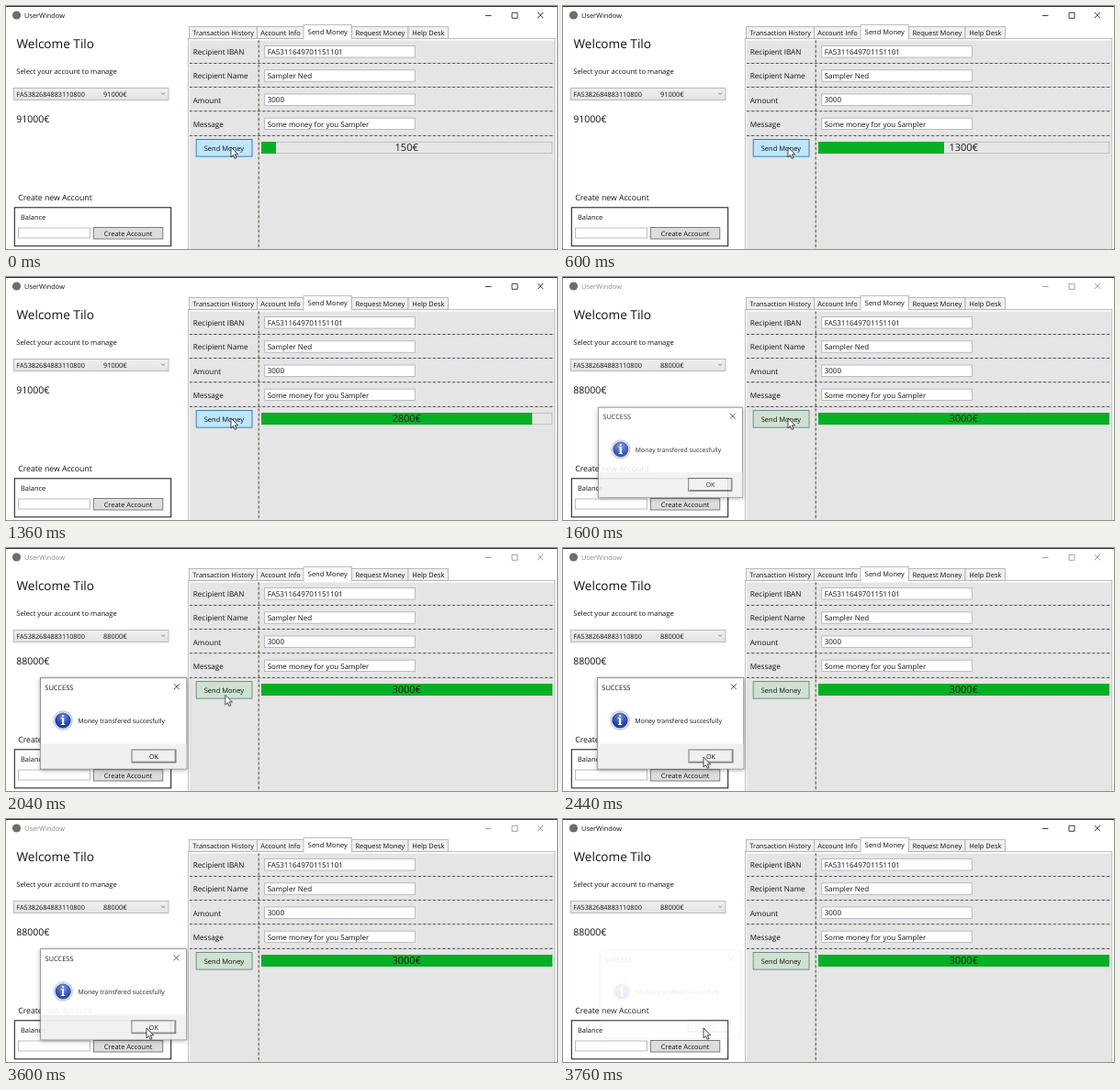
Animation of 600 by 265 pixels, one loop 3.8 s. Source, as an HTML page:

```html
<!DOCTYPE html>
<html lang="en">
<head>
<meta charset="utf-8">
<title>Money transfer</title>
<style>
  @property --amount { syntax: "<integer>"; inherits: true; initial-value: 150; }

  html, body { margin: 0; width: 100%; height: 100%; overflow: hidden; background: #fff; }
  body { position: relative; font-family: "Open Sans", "Noto Sans", sans-serif; text-rendering: geometricPrecision; }
  svg { position: absolute; left: 0; top: 0; width: 600px; height: 265px; }
  text { font-size: 7.45px; fill: #111; }
  .label { font-size: 8.15px; }
  .input rect { fill: #fff; stroke: #abadb3; stroke-width: .8; }
  .input text { font-size: 8px; }
  .number { font-size: 7.25px; }
  .balance { font-size: 10.5px; }
  .tab rect { fill: #f0f0f0; stroke: #acacac; stroke-width: .8; }
  .tab.open rect { fill: #fff; }
  .grid { fill: none; stroke: #d8cf6a; }
  .grid.dash { stroke: #3b3fb4; stroke-dasharray: 2.65; }
  .mid { text-anchor: middle; }

  .old, .new, .caption, .controls, .send, .dialog, .cursor, .progress {
    animation: 3800ms infinite;
  }
  .old { animation-name: leave; animation-timing-function: step-end; }
  .new { animation-name: arrive; animation-timing-function: step-end; }
  .caption { font-size: 7.4px; animation-name: caption; animation-timing-function: step-end; }
  .controls { fill: none; stroke: #111; stroke-width: .8; animation-name: controls; animation-timing-function: step-end; }
  .send { animation-name: send; animation-timing-function: step-end; }
  .dialog { transform-origin: 117px 191px; filter: drop-shadow(0 1px 2.5px #0005); animation-name: dialog; animation-timing-function: linear; }
  .cursor { animation-name: move; animation-timing-function: linear; }

  @keyframes leave { 0% { opacity: 1; } 39.5%, 100% { opacity: 0; } }
  @keyframes arrive { 0% { opacity: 0; } 39.5%, 100% { opacity: 1; } }
  @keyframes caption { 0%, 95.7% { fill: #111; } 40% { fill: #8a8a8a; } 100% { fill: #111; } }
  @keyframes controls { 0%, 95.7% { stroke: #111; } 40% { stroke: #8a8a8a; } 100% { stroke: #111; } }
  @keyframes send {
    0% { fill: #bee6fd; stroke: #3c7fb1; }
    40%, 100% { fill: #cfe2d1; stroke: #71908a; }
  }
  @keyframes dialog {
    0%, 40% { opacity: 0; transform: scale(.93); }
    42.1% { opacity: .87; transform: scale(.985); }
    44.2%, 94.4% { opacity: 1; transform: none; }
    98.95% { opacity: .1; transform: scale(.96); }
    100% { opacity: 0; transform: scale(.95); }
  }
  @keyframes move {
    0%, 51.6% { transform: translate(245px, 154px); }
    53.68% { transform: translate(239px, 160px); }
    58.95% { transform: translate(186px, 201px); }
    64.2%, 100% { transform: translate(153px, 228px); }
  }

  /* One number drives both the bar and its caption. */
  .progress {
    position: absolute; left: 278px; top: 148px; width: 316.5px; height: 13px;
    background: #e6e6e6; box-shadow: inset 0 0 0 1px #c2c2c2;
    font-size: 11px; line-height: 14px; text-align: center; color: #1c1c1c;
    animation-name: count;
  }
  .progress::before {
    content: ""; position: absolute; left: 0; top: 0; height: 100%;
    width: calc(var(--amount) * 1% / 30); background: #06b025;
  }
  .progress::after {
    position: relative; counter-reset: euro var(--amount); content: counter(euro) "€";
  }
  @keyframes count {
    0% { --amount: 150; animation-timing-function: steps(57); }
    38.2%, 100% { --amount: 3000; }
  }
</style>
</head>
<body>
<svg viewBox="0 0 600 265">
  <defs>
    <linearGradient id="face" x2="0" y2="1"><stop stop-color="#f0f0f0"/><stop offset="1" stop-color="#e3e3e3"/></linearGradient>
    <radialGradient id="ball" cy=".3"><stop stop-color="#6f92e6"/><stop offset="1" stop-color="#1f3fae"/></radialGradient>
    <path id="lines" d="M200 62.5H597M200 88.5H597M200 114.7H597M200 141.4H597M275.2 37.5V265"/>
  </defs>
  <rect width="600" height="265" fill="#fff"/>
  <rect width="600" height="1" fill="#2a2a2a"/>

  <!-- title bar -->
  <circle cx="11.5" cy="10" r="4.6" fill="#6a706a"/>
  <text class="caption" x="20" y="12.7">UserWindow</text>
  <path class="controls" d="M522 10.5h6.5M551 7.3h6v6h-6zM578.8 7l6.2 6.2m0-6.2l-6.2 6.2"/>

  <!-- account column -->
  <text x="11.5" y="46" style="font-size:13.6px">Welcome Tilo</text>
  <text x="11.3" y="74" style="font-size:7.65px">Select your account to manage</text>
  <rect x="8.5" y="89.5" width="168.5" height="13" fill="url(#face)" stroke="#acacac" stroke-width=".8"/>
  <text class="number" x="11.3" y="98.9">FA5382684883110800</text>
  <path d="M169.3 94.7l1.8 1.8 1.8-1.8" fill="none" stroke="#666" stroke-width=".8"/>
  <g class="old"><text x="106" y="98.9">91000€</text><text class="balance" x="11.3" y="126.5">91000€</text></g>
  <g class="new"><text x="106" y="98.9">88000€</text><text class="balance" x="11.3" y="126.5">88000€</text></g>

  <text x="13.2" y="211.5" style="font-size:8.7px">Create new Account</text>
  <rect x="9.3" y="219.8" width="170.4" height="42" fill="none" stroke="#111"/>
  <text x="16" y="232.7">Balance</text>
  <rect x="13.5" y="242" width="78" height="11" fill="#fff" stroke="#abadb3" stroke-width=".8"/>
  <rect x="95.3" y="241.5" width="75.5" height="12.5" fill="#ddd" stroke="#707070" stroke-width=".9"/>
  <text class="mid" x="133" y="250.6">Create Account</text>

  <!-- tabs -->
  <rect x="198.4" y="35.4" width="399.4" height="240" fill="#fff" stroke="#acacac" stroke-width=".8"/>
  <rect x="200" y="37.5" width="397" height="228" fill="#e5e5e5"/>
  <g class="tab"><rect x="199.5" y="22.4" width="74" height="13"/><text class="mid" x="236.7" y="31.7">Transaction History</text></g>
  <g class="tab"><rect x="273.5" y="22.4" width="51" height="13"/><text class="mid" x="299" y="31.7">Account Info</text></g>
  <g class="tab"><rect x="376.5" y="22.4" width="61.5" height="13"/><text class="mid" x="407.3" y="31.7">Request Money</text></g>
  <g class="tab"><rect x="438" y="22.4" width="43.5" height="13"/><text class="mid" x="459.8" y="31.7">Help Desk</text></g>
  <g class="tab open"><rect x="324" y="20.6" width="52.5" height="15.4"/><text class="mid" x="350.3" y="31">Send Money</text></g>
  <rect x="324.5" y="35" width="51.6" height="2" fill="#fff"/>

  <!-- transfer form -->
  <use href="#lines" class="grid"/>
  <use href="#lines" class="grid dash"/>
  <text class="label" x="203.7" y="53">Recipient IBAN</text>
  <text class="label" x="203.7" y="79.4">Recipient Name</text>
  <text class="label" x="203.7" y="105.6">Amount</text>
  <text class="label" x="203.7" y="132">Message</text>
  <g class="input"><rect x="281.7" y="43.6" width="163.6" height="12.4"/><text x="284.7" y="52.8">FA5311649701151101</text></g>
  <g class="input"><rect x="281.7" y="69.8" width="163.6" height="12.4"/><text x="284.7" y="79">Sampler Ned</text></g>
  <g class="input"><rect x="281.7" y="96" width="163.6" height="12.4"/><text x="284.7" y="105.3">3000</text></g>
  <g class="input"><rect x="281.7" y="122.2" width="163.6" height="12.4"/><text x="284.7" y="131.5">Some money for you Sampler</text></g>
  <rect class="send" x="207.2" y="145.5" width="60.8" height="18.6"/>
  <text class="mid" x="237.4" y="158" style="font-size:7.55px">Send Money</text>

  <!-- message box -->
  <g class="dialog">
    <rect x="37.4" y="141.5" width="159.4" height="99.4" fill="#fff" stroke="#7a7a7a" stroke-width=".8"/>
    <rect x="37.8" y="213.5" width="158.6" height="27" fill="#f0f0f0"/>
    <text x="42.3" y="154.7">SUCCESS</text>
    <path d="M182.8 148.2l6 6m0-6l-6 6" fill="none" stroke="#222" stroke-width=".8"/>
    <circle cx="62" cy="188" r="10.3" fill="#e4e6ea" stroke="#a9adb5" stroke-width=".7"/>
    <circle cx="62" cy="188" r="8.6" fill="url(#ball)"/>
    <text class="mid" x="62" y="193.2" style="font:bold 14.5px 'Noto Serif',serif;fill:#fff">i</text>
    <text x="78.3" y="190.7" style="font-size:6.97px">Money transfered succesfully</text>
    <rect x="137" y="220" width="48" height="14" fill="#f0f0f0" stroke="#555" stroke-width=".8"/>
    <path d="M138 233.2h46.2v-12.4" fill="none" stroke="#777"/>
    <text class="mid" x="161" y="229.7" style="font-size:7.2px">OK</text>
  </g>

  <path class="cursor" d="M0 0V10.8L2.5 8.5 4.2 12.3 6 11.5 4.3 7.8H7.7Z" fill="#fff" stroke="#111" stroke-width=".75"/>
</svg>
<div class="progress"></div>
</body>
</html>
```
